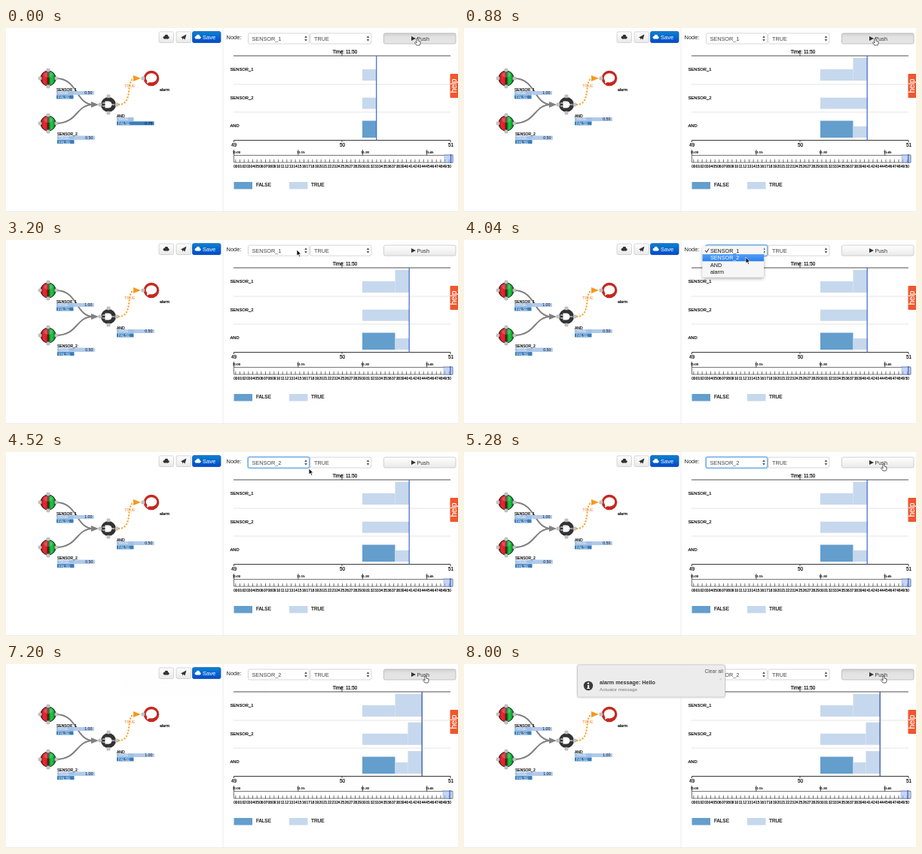
Animation, 600 px wide and 245 px high, one loop 8040 ms. Source, as an HTML page:

```html
<!DOCTYPE html>
<html lang="en">
<head>
<meta charset="utf-8">
<title>Sensor network</title>
<style>
html, body { margin: 0; width: 100%; height: 100%; overflow: hidden; background: #fff; }
svg { display: block; width: 100vw; height: 100vh; font-family: "Liberation Sans", Arial, sans-serif; }
</style>
</head>
<body>
<svg id="stage" viewBox="0 0 600 245">
  <defs>
    <linearGradient id="ball">
      <stop offset="0" stop-color="#7d0a0a"/><stop offset=".2" stop-color="#e82a30"/>
      <stop offset=".4" stop-color="#d8222a"/><stop offset=".49" stop-color="#4a1010"/>
      <stop offset=".55" stop-color="#0c5c1c"/><stop offset=".68" stop-color="#1fc843"/>
      <stop offset=".82" stop-color="#1cb83c"/><stop offset="1" stop-color="#07451a"/>
    </linearGradient>
    <linearGradient id="button" x2="0" y2="1">
      <stop offset="0" stop-color="#fff"/><stop offset="1" stop-color="#e9e9e9"/>
    </linearGradient>
    <linearGradient id="pressed" x2="0" y2="1">
      <stop offset="0" stop-color="#cfcfcf"/><stop offset=".35" stop-color="#e2e2e2"/>
      <stop offset="1" stop-color="#e6e6e6"/>
    </linearGradient>
    <linearGradient id="primary" x2="0" y2="1">
      <stop offset="0" stop-color="#0a83d0"/><stop offset="1" stop-color="#0549cb"/>
    </linearGradient>
    <linearGradient id="choice" x2="0" y2="1">
      <stop offset="0" stop-color="#559ff5"/><stop offset="1" stop-color="#2a80f0"/>
    </linearGradient>
    <filter id="shadow" x="-20%" y="-20%" width="140%" height="160%">
      <feDropShadow dx="0" dy="2" stdDeviation="2.2" flood-opacity=".32"/>
    </filter>
  </defs>
  <g id="scene"></g>
  <g id="live"></g>
</svg>
<script>
const LOOP = 8040;
const FIRST_PUSH = 440, LEAVE_BUTTON = 1880, OPEN = 3320, CLOSE = 4320;
const SECOND_PRESS = 7000, SECOND_PUSH = 7160, NOTICE = 7200;
const DARK = '#649ecd', PALE = '#c6d8ed', TRUE_BAR = '#a3c1e5', FALSE_BAR = '#3a7dba';
const START = 473, SPAN = 18.7, PUSH_1 = 516.5, PUSH_2 = 533.5;

// time, x, y of the pointer tip
const POINTER = [
  [0, 546, 14], [1720, 546, 14], [2150, 450, 6], [2400, 410, 3], [2700, 402, 1],
  [3150, 386, 13], [3450, 386, 13], [3880, 374, 23], [4380, 374, 23],
  [4950, 557, 16], [LOOP, 557, 16]
];

const attrs = o => Object.entries(o).map(([k, v]) => `${k}="${v}"`).join(' ');
const tag = (name, o) => `<${name} ${attrs(o)}/>`;
const rect = (x, y, width, height, fill, more = {}) =>
  tag('rect', { x, y, width, height, fill, ...more });
const line = (x1, y1, x2, y2, stroke, w = .8) =>
  tag('line', { x1, y1, x2, y2, stroke, 'stroke-width': w });
const path = (d, fill = 'none', more = {}) => tag('path', { d, fill, ...more });
const circle = (cx, cy, r, fill, more = {}) => tag('circle', { cx, cy, r, fill, ...more });
const ellipse = (cx, cy, rx, ry, fill, more = {}) => tag('ellipse', { cx, cy, rx, ry, fill, ...more });
const text = (s, x, y, size, fill = '#222', more = {}) =>
  `<text ${attrs({ x, y, 'font-size': size, fill, ...more })}>${s}</text>`;
const label = (s, x, y, size, more = {}) =>
  text(s, x, y, size, '#000', { stroke: '#000', 'stroke-width': .18, ...more });
const centred = { 'text-anchor': 'middle' };
const box = (x, y, w, h, fill = '#fff', stroke = '#ccc') =>
  rect(x, y, w, h, fill, { rx: 2, stroke, 'stroke-width': .8 });

function ports(x, y, r, sides) {
  const at = { l: [-r, 0], r: [r, 0], t: [0, -r], b: [0, r] };
  return [...sides].map(s => rect(x + at[s][0] - 2.1, y + at[s][1] - 2.1, 4.2, 4.2, '#c4c4c4',
    { rx: 1, stroke: '#a2a2a2', 'stroke-width': .5 })).join('');
}

const sensor = (x, y) =>
  circle(x, y, 10, 'url(#ball)', { stroke: '#1c1c1c', 'stroke-width': 1 }) +
  ellipse(x, y - 4.5, 5.5, 3.4, '#fff', { opacity: .2 }) + ports(x, y, 10.8, 'lrtb');

function network() {
  const wire = y => path(`M66 ${y}C96 ${y} 92 102 116 102`, 'none', { stroke: '#7f7f7f', 'stroke-width': 2 });
  const gate = path('M131.5 97.5H136A4.5 4.5 0 0 1 136 106.5H131.5Z', '#fff') +
    path('M128 100H132M128 104H132M140 102H144', 'none', { stroke: '#fff', 'stroke-width': 1.2 });
  return wire(67) + wire(127) + path('M113 98L123 102L113 106Z', '#7f7f7f') +
    path('M149 102C171 102 157 67 172 67', 'none',
      { stroke: '#f5a32b', 'stroke-width': 2, 'stroke-dasharray': '2.2 1.8' }) +
    path('M169 63L179 67L169 71Z', '#f39a1d') +
    text('TRUE', 157, 78.5, 5.4, '#ee8a3c') +
    sensor(56, 67) + sensor(56, 127) +
    circle(136, 102, 10, '#333') + gate + ports(136, 102, 11, 'lrtb') +
    circle(193, 67, 10.3, '#c5281f') + ellipse(193, 66.4, 7.2, 6.2, '#fff') +
    path('M187.5 69L187 74L192 71.5Z', '#fff') + ports(193, 67, 11, 'l') +
    label('alarm', 204, 84, 5.3) + label('SENSOR_1', 67, 83.5, 5) +
    label('SENSOR_2', 68, 143, 5) + label('AND', 147, 118.7, 5);
}

function toolbar() {
  const cloud = (x, y, c) => circle(x - 2, y + .6, 1.9, c) + circle(x + .4, y - .8, 2.4, c) +
    circle(x + 2.5, y + .8, 1.7, c) + rect(x - 2, y, 4.5, 2.5, c);
  return box(203, 5, 19.5, 14.5, 'url(#button)') + box(226, 5, 19.5, 14.5, 'url(#button)') +
    box(247.5, 4.7, 37.5, 14.8, 'url(#primary)', '#0a4fb4') +
    cloud(212.5, 12, '#333') + path('M232 12.5L239.5 8.5L237.5 15.5L235.5 13.8L234 15.5V13.2Z', '#333') +
    cloud(254.5, 12, '#fff') + text('Save', 261, 14.9, 7.5, '#fff');
}

function axes() {
  let s = line(302, 37, 590, 37, '#222') + line(446, 29, 446, 37, '#222') +
    label('Time: 11:50', 450, 34, 6.3, centred) +
    line(302, 75, 590, 75, '#dedede') + line(302, 112, 590, 112, '#dedede') +
    path('M302.5 152V149.5H590V152', 'none', { stroke: '#222', 'stroke-width': .9 }) +
    line(446, 149, 446, 152, '#222') +
    path('M302.5 169.5H593V179H302.5Z', '#fff', { stroke: '#555', 'stroke-width': .8 });
  ['SENSOR_1', 'SENSOR_2', 'AND'].forEach((name, i) => s += label(name, 297.5, 57 + i * 37.7, 5.8));
  [49, 50, 51].forEach((n, i) => s += label(n, 302.5 + i * 144, 158.3, 6.4, centred));
  ['11:00', '11:15', '11:30', '11:45'].forEach((hour, i) => {
    const x = 302.5 + i * 85.4;
    s += line(x, 162, x, 169.5, '#222') + label(hour, x - 1.8, 167.3, 4.3);
  });
  for (let i = 0; i <= 50; i++) {
    const x = 304.8 + i * 5.67;
    s += line(x, 175, x, 179, '#333', .7) +
      label(String(i).padStart(2, '0'), x, 186, 4.7, centred);
  }
  const mono = { 'font-family': '"DejaVu Sans Mono", monospace' };
  return s + rect(302.5, 205, 24.5, 9.5, DARK) + rect(376, 205, 24.5, 9.5, PALE) +
    label('FALSE', 332, 211, 6.4, mono) + label('TRUE', 405, 211, 6.4, mono);
}

function beliefs(x, y, truth) {
  const major = truth >= .5, value = major ? truth : 1 - truth, w = 49.5;
  return rect(x, y, major ? w : 22.5, 5, TRUE_BAR) +
    (major ? rect(x + 22.5, y, w - 22.5, 5, '#b0caea') : '') +
    rect(x, y + 5.4, major ? 22.5 : w, 5, FALSE_BAR) +
    text('TRUE', x + 2, y + 4.4, 5, '#eef4fc') + text('FALSE', x + 2, y + 9.8, 5, '#fff') +
    text(value.toFixed(2), x + w - 2, y + (major ? 4.4 : 9.8), 5.3, '#0c1626', { 'text-anchor': 'end' });
}

function chart(stage) {
  const end = [START, PUSH_1, PUSH_2][stage] + SPAN;
  // each row: bottom edge, then [start, level, colour, first stage] pieces
  const rows = [
    [70, [START, .5, PALE, 0], [PUSH_1, 1, PALE, 1]],
    [107.7, [START, .5, PALE, 0], [PUSH_2, 1, PALE, 2]],
    [146, [START, .75, DARK, 0], [PUSH_1, .5, PALE, 1], [PUSH_2, 1, PALE, 2]]
  ];
  let s = '';
  for (const [bottom, ...all] of rows) {
    const pieces = all.filter(p => p[3] <= stage);
    pieces.forEach(([x, level, fill], i) => {
      const right = i + 1 < pieces.length ? pieces[i + 1][0] : end;
      s += rect(x, bottom - level * 30, right - x, level * 30, fill);
    });
  }
  const brush = 582 - stage, now = 590.5 - stage * .7;
  return s + line(end, 37, end, 149.5, stage === 2 ? '#34488f' : '#3f66d2', 1.2) +
    rect(brush, 168.5, 11.5, 11, '#9db8ee', { opacity: .6, stroke: '#6d83b8', 'stroke-width': .6 }) +
    line(now, 168, now, 180, '#2f58d6', 1.2);
}

function select(x, w, value, focused) {
  const glow = focused ? rect(x - .8, 6.2, w + 1.6, 15.6, 'none',
    { rx: 3, stroke: '#a6cdf0', 'stroke-width': 1.6 }) : '';
  const m = x + w - 4.5;
  return glow + box(x, 7, w, 14, '#fff', focused ? '#4f9be0' : '#ccc') + text(value, x + 5, 16.6, 7.3, '#444') +
    path(`M${m - 1.8} 13L${m} 10.2L${m + 1.8} 13ZM${m - 1.8} 15L${m} 17.8L${m + 1.8} 15Z`, '#555');
}

function controls(t) {
  const pressed = t < LEAVE_BUTTON || t >= SECOND_PRESS;
  const focused = t >= OPEN && t < SECOND_PRESS;
  return text('Node:', 292.5, 15.2, 7.5) +
    select(321.5, 81, t < CLOSE ? 'SENSOR_1' : 'SENSOR_2', focused) + select(404, 81, 'TRUE', false) +
    box(501.5, 7, 95.5, 14, pressed ? 'url(#pressed)' : 'url(#button)', pressed ? '#b5b5b5' : '#c6c6c6') +
    path('M538 11L544 14L538 17Z', '#333') + text('Push', 545.5, 16.7, 7.2, '#333');
}

function menu(t) {
  const active = t > 3680 ? 1 : 0;
  let s = rect(316.5, 8, 81.5, 41.5, '#f6f6f6', { rx: 2.5, filter: 'url(#shadow)' }) +
    rect(316.5, 9.5 + active * 9.4, 81.5, 9.4, 'url(#choice)');
  ['SENSOR_1', 'SENSOR_2', 'AND', 'alarm'].forEach((name, i) =>
    s += text(name, 327, 17 + i * 9.4, 7.2, i === active ? '#fff' : '#111'));
  return s + path('M320 14L322 16.5L325 11.5', 'none',
    { stroke: active ? '#222' : '#fff', 'stroke-width': 1 });
}

function notice(t) {
  const p = Math.min(1, (t - NOTICE) / 320);
  return `<g opacity="${p}">` +
    rect(149, 0, 199, 46, '#000', { opacity: .07, rx: 4 }) +
    rect(150.5, 1, 196, 43, '#ececec', { rx: 3, stroke: '#c9c9c9', 'stroke-width': .8 }) +
    text('Clear all', 344, 12, 6.7, '#555', { 'text-anchor': 'end' }) + text('×', 339, 22, 6, '#bbb') +
    circle(165, 29, 6.2, '#3b3b3b') + rect(164, 28, 2.2, 5, '#fff') +
    rect(163.2, 32, 3.8, 1, '#fff') + circle(165, 25.8, 1.2, '#fff') +
    text('alarm message: Hello', 180, 27, 7.2, '#333', { 'font-weight': 'bold' }) +
    text('Actuator message', 180, 36.2, 6.2, '#777') + '</g>';
}

function pointer(t) {
  const i = POINTER.findIndex((k, n) => n && t <= k[0]);
  const [t0, x0, y0] = POINTER[i - 1], [t1, x1, y1] = POINTER[i];
  const u = (t - t0) / (t1 - t0), e = u * u * (3 - 2 * u);
  const x = x0 + (x1 - x0) * e, y = y0 + (y1 - y0) * e;
  const hand = x > 501;
  const d = hand
    ? 'M-1 0Q0-1 1 0V3L4 4V7L3 9H-1L-3.5 5.5L-2.5 4.5L-1 6Z'
    : 'M0 0V8L1.9 6.3L3.2 9.3L4.6 8.7L3.3 5.8H5.8Z';
  return path(d, hand ? '#fff' : '#111', { transform: `translate(${x} ${y})`,
    stroke: hand ? '#222' : '#fff', 'stroke-width': .7 });
}

const help = () => rect(589.5, 61, 11, 32, '#f0562d', { rx: 1 }) +
  text('help', 0, 0, 10, '#fff', { transform: 'translate(598.3 86.5) rotate(-90)', stroke: '#fff', 'stroke-width': .2 });

function draw(t) {
  const stage = t < FIRST_PUSH ? 0 : t < SECOND_PUSH ? 1 : 2;
  live.innerHTML = beliefs(67, 84, stage ? 1 : .5) + beliefs(68, 143.7, stage === 2 ? 1 : .5) +
    beliefs(147, 119, [.25, .5, 1][stage]) + chart(stage) + controls(t) + help() +
    (t >= OPEN && t < CLOSE ? menu(t) : '') + (t >= NOTICE ? notice(t) : '') + pointer(t);
}

const live = document.getElementById('live');
document.getElementById('scene').innerHTML =
  line(288, 0, 288, 245, '#e8e8e8') + line(0, 244.5, 600, 244.5, '#e8e8e8') +
  toolbar() + network() + axes();

const began = performance.now();
function tick() {
  draw((performance.now() - began) % LOOP);
  requestAnimationFrame(tick);
}
draw(0);
requestAnimationFrame(tick);
</script>
</body>
</html>
```
